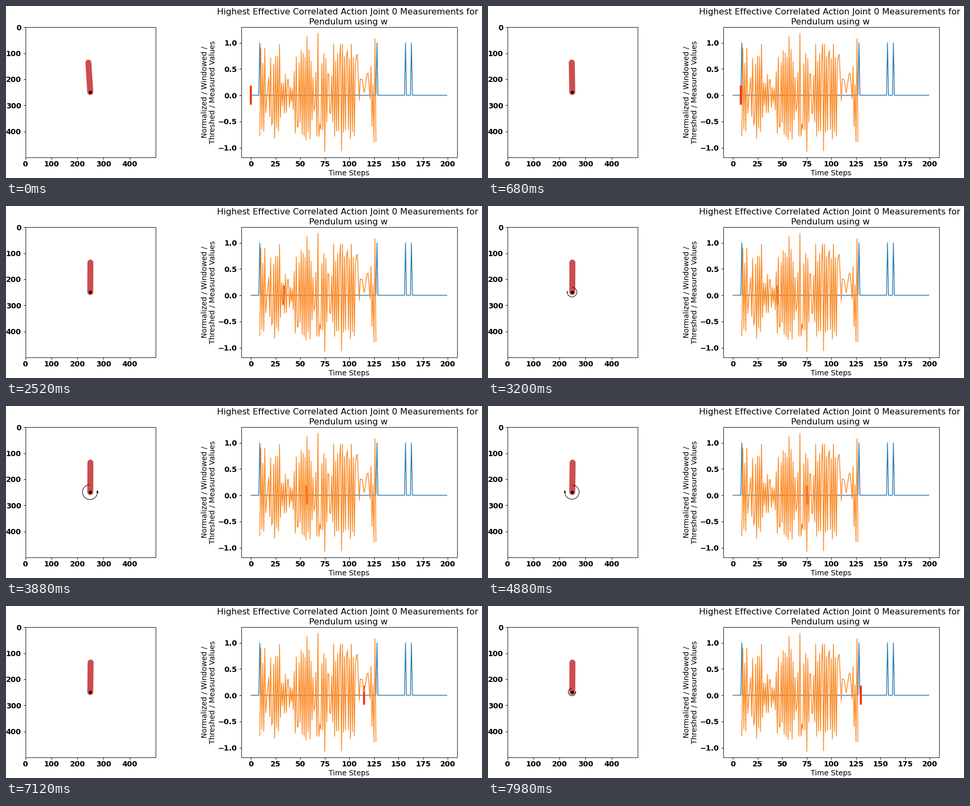
Write a matplotlib script that moves like this. It is 900x326 px and loops after 8 s.

```python
import random
import numpy as np
import matplotlib.pyplot as plt
from matplotlib.animation import FuncAnimation

W, H = 900, 326
PX = 0.72  # points per pixel at 100 dpi
plt.rcParams["font.family"] = "DejaVu Sans"

fig = plt.figure(figsize=(W / 100, H / 100), dpi=100, facecolor="white")
ax = fig.add_axes([0, 0, 1, 1])
ax.set_xlim(0, W)
ax.set_ylim(H, 0)
ax.axis("off")

BOTTOM, TOP = 287, 40
LABEL = 13.9 * PX
TITLE = 16.3 * PX


def line(x, y, color="black", width=0.9, **kw):
    return ax.plot(x, y, color=color, lw=width * PX, **kw)[0]


def panel(left, right, xticks, yticks):
    """Frame with ticks; each tick is a (pixel, label) pair."""
    line([left, right, right, left, left], [TOP, TOP, BOTTOM, BOTTOM, TOP],
         solid_joinstyle="miter", zorder=5)
    for x, s in xticks:
        line([x, x], [BOTTOM, BOTTOM + 4], solid_capstyle="butt")
        ax.text(x, BOTTOM + 6.5, s, size=LABEL, weight="bold",
                ha="center", va="top")
    for y, s in yticks:
        line([left - 4, left], [y, y], solid_capstyle="butt")
        ax.text(left - 7.8, y, s, size=LABEL, weight="bold",
                ha="right", va="center_baseline")


def px(step):
    return 463.2 + 1.861 * np.asarray(step)


def py(value):
    return 169.2 - 99.4 * np.asarray(value)


hundreds = range(0, 500, 100)
panel(36.5, 282.5,
      [(36.5 + 0.4925 * v, str(v)) for v in hundreds],
      [(40.2 + 0.494 * v, str(v)) for v in hundreds])
panel(445, 852.5,
      [(px(v), str(v)) for v in range(0, 201, 25)],
      [(py(v / 2), f"{v / 2:.1f}".replace("-", "\u2212"))
       for v in range(-2, 3)])

ax.text(645.5, 15.8, "Highest Effective Correlated Action Joint 0 "
        "Measurements for", size=TITLE, ha="center", va="baseline")
ax.text(647.5, 35.3, "Pendulum using w", size=TITLE,
        ha="center", va="baseline")
ax.text(648.5, 321, "Time Steps", size=LABEL, ha="center", va="baseline")
for x, s in ((382.5, "Normalized / Windowed /"),
             (397.5, "Threshed / Measured Values")):
    ax.text(x, 163.5, s, size=LABEL, rotation=90, ha="right", va="center")

# Thresholded pulses
steps = np.arange(200)
pulses = np.isin(steps, [9, 128, 157, 163]).astype(float)
line(px(steps), py(pulses), "#2b7cb7", 1.5, zorder=2)

# Measured action: the main extremes, with a zigzag filled in between
FIRST, CALM, LAST = 9, 108, 127
EXTREMES = {
    9: -.77, 10: .9, 14: .9, 16: -.08, 18: .34, 20: .71, 22: -.52, 24: -.82,
    29: .97, 31: .24, 35: .4, 38: .3, 42: .13, 45: -.72, 46: .73, 48: -.6,
    51: .85, 57: 1.12, 60: -.84, 65: -.2, 68: 1.18, 70: -.55, 71: -.65,
    75: -1.07, 79: .4, 81: -.35, 84: .98, 88: .8, 91: .98, 92: -1.06,
    98: .86, 102: .98, 107: .75, 108: .78}
TAIL = {108: .78, 110: -.1, 111: .31, 113: .3, 115: .05, 118: .41, 119: .42,
        121: -.07, 122: .55, 123: -.6, 124: .2, 125: -.89, 126: 1.08,
        127: -.88}


def measure():
    rng = random.Random(4)
    keys = list(EXTREMES)
    sizes = np.abs(list(EXTREMES.values()))
    values = []
    for s in range(FIRST, CALM):
        if s in EXTREMES:
            v = EXTREMES[s]
        else:
            size = np.interp(s, keys, sizes) * rng.uniform(0.65, 0.95)
            v = -np.sign(values[-1]) * size
        values.append(v)
    calm = np.interp(range(CALM, LAST + 1), list(TAIL), list(TAIL.values()))
    return np.append(values, calm)


action = measure()
line(px(np.arange(FIRST, LAST + 1)), py(action), "#fc8a26", 1.5, zorder=4)

# Moving parts
PIVOT = np.array([159.3, 163.2])
ROD = 56
TURN = np.radians(np.linspace(95, 362, 60))
cursor = line([], [], "#f53b10", 4, zorder=3, solid_capstyle="butt")
rod = line([], [], (0.8, 0.3, 0.3), 11.3, zorder=6, solid_capstyle="round")
line([PIVOT[0]], [PIVOT[1]], "black", 0, marker="o", markersize=5.7 * PX,
     markeredgewidth=0, zorder=7)
arc = line([], [], "black", 1, zorder=8, solid_capstyle="butt")
head = ax.fill([0, 0, 0], [0, 0, 0], color="black", lw=0, zorder=8)[0]


def step_at(t):
    """Playback starts slowly, then runs at a steady rate."""
    return int(round(np.interp(t, [0, 1400, 2520, 7980], [0, 16, 33, 130])))


def torque(step):
    if step < FIRST:
        return 0.0
    if step <= LAST:
        return action[step - FIRST]
    return 0.55 * (-1) ** step


def tilt_at(step):
    """Settles upright, then leans right for a while."""
    lean = 1.5 * np.exp(-((step - 95) / 18) ** 2)
    return np.radians(3.9 * np.exp(-step / 7) - 0.3 - lean)


def draw(i):
    step = step_at(i * 20)
    cursor.set_data([px(step)] * 2, [151, 187])

    tilt = tilt_at(step)
    tip = PIVOT - ROD * np.array([np.sin(tilt), np.cos(tilt)])
    rod.set_data([PIVOT[0], tip[0]], [PIVOT[1], tip[1]])

    u = torque(step)
    r = 12.6 * abs(u)
    shown = r > 3
    arc.set_visible(shown)
    head.set_visible(shown)
    if shown:
        side = np.sign(u)
        cx, cy = PIVOT[0] - 0.5, PIVOT[1]
        arc.set_data(cx + side * r * np.cos(TURN), cy - r * np.sin(TURN))
        hx, k = cx + side * r, r / 14
        head.set_xy([(hx - 2.2 * k, cy + 1.2 * k), (hx + 2.2 * k, cy + 1.2 * k),
                     (hx, cy - 4 * k)])
    return cursor, rod, arc, head


anim = FuncAnimation(fig, draw, frames=400, interval=20, repeat=True,
                     repeat_delay=0, init_func=lambda: draw(0))
plt.show()
```
